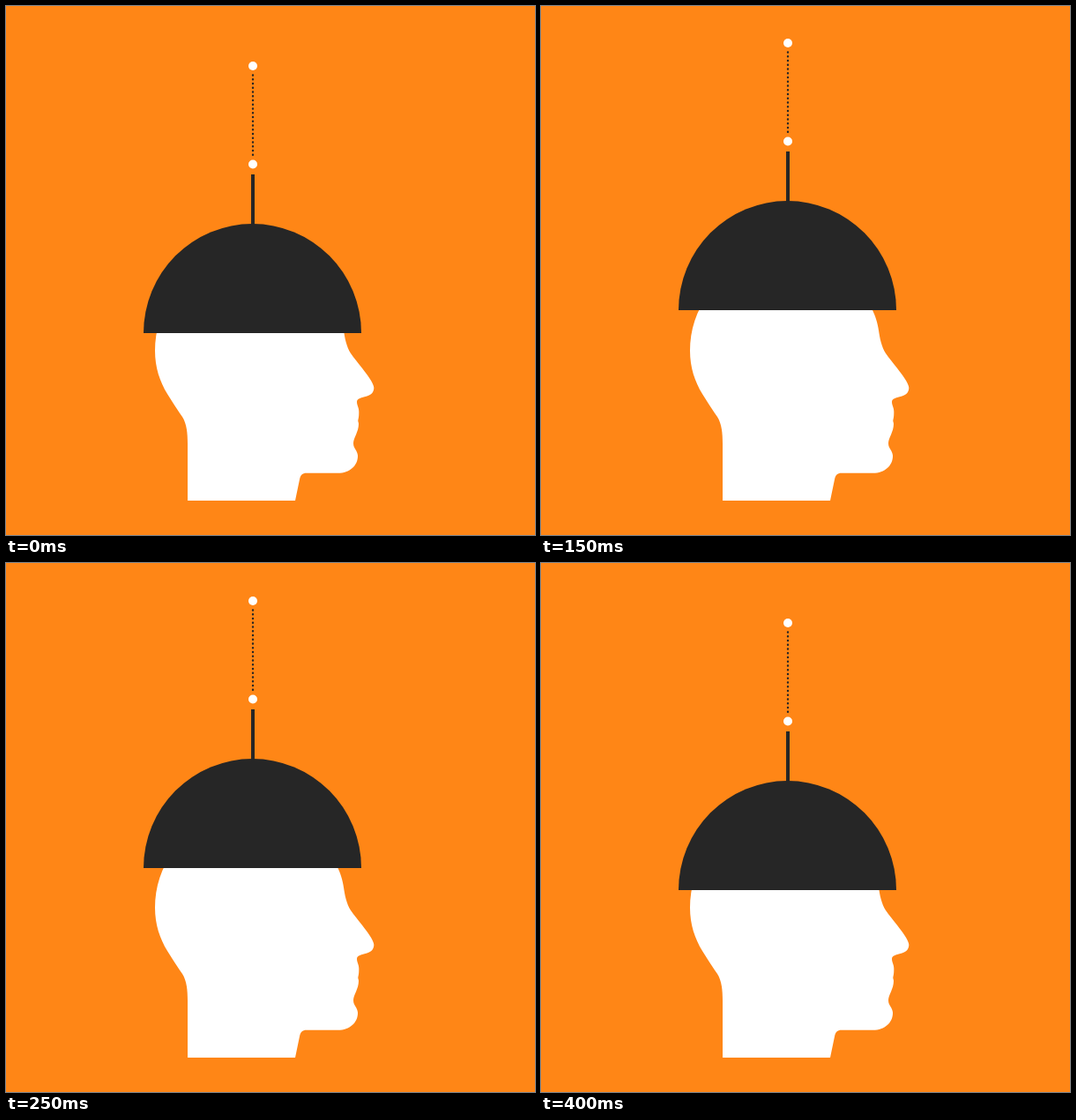
Write an HTML page that moves like this. It is 600 by 600 pixels and loops after 450 ms.

```html
<!DOCTYPE html>
<html lang="en">
<head>
<meta charset="utf-8">
<title>Open mind</title>
<style>
  html, body { margin: 0; width: 100%; height: 100%; overflow: hidden; background: #ff8616; }
  svg { display: block; width: 100vw; height: 100vh; }
  .white { fill: #fff; }
  .dark { fill: #262626; }
  .dots { fill: none; stroke: #262626; stroke-width: 2.4; stroke-linecap: round; stroke-dasharray: 0 4.75; }
  .lid { animation: lift 450ms step-end infinite; }
  /* Nine equal holds: up in four steps, down in four. */
  @keyframes lift {
    0% { transform: translateY(0); }
    11.11% { transform: translateY(-9px); }
    22.22% { transform: translateY(-17px); }
    33.33% { transform: translateY(-26px); }
    44.44% { transform: translateY(-34px); }
    55.55% { transform: translateY(-25px); }
    66.66% { transform: translateY(-17px); }
    77.77% { transform: translateY(-8px); }
    88.88%, 100% { transform: translateY(0); }
  }
</style>
</head>
<body>
<svg viewBox="0 0 600 600">
  <path class="white" d="M191 326 C176 345 169 368 169 391 C169 410 174.500 426 183 440
    C190 451.500 195 458.500 200 466 C205 474 206 484 206 497 V561 H328
    L333 537 C334 532 336 529.800 341 529.800 H376
    C390 530 399 521 399 510.500 C399 504 394 502.500 394 496
    C394 490 400 483 400 474 C400 472 398.800 471 399.500 469
    C400.300 466 400.300 463 400.300 460 C400.300 455 398 453 398 449
    C398 441.500 417.300 446 417.300 433 C417.300 425 397 403 391 394
    C386 386 384.200 376 383 368 C382 360 379 351 376 345 C373 339 369 333 364 326 Z"/>
  <g class="lid">
    <path class="dark" d="M156 371 A123.500 124 0 0 1 403 371 Z"/>
    <rect class="dark" x="278" y="191" width="4" height="58"/>
    <path class="dots" d="M280 78.500 V169"/>
    <circle class="white" cx="280" cy="68" r="5"/>
    <circle class="white" cx="280" cy="179.500" r="5"/>
  </g>
</svg>
</body>
</html>
```
